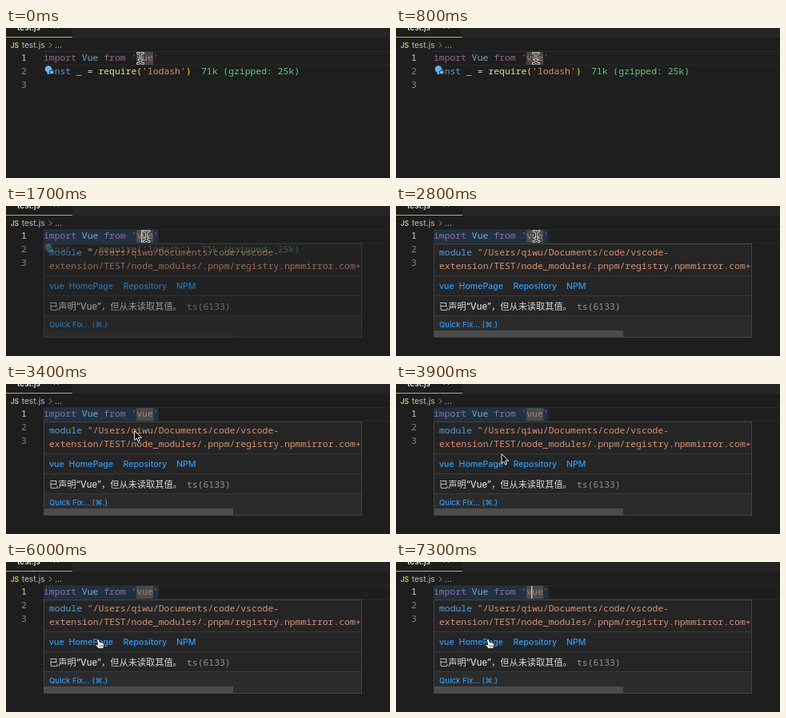
Animation, 480 px wide and 188 px high, one loop 8000 ms. Source, as an HTML page:

```html
<!DOCTYPE html>
<html lang="en">
<head>
<meta charset="utf-8">
<title>Hover card in a code editor</title>
<style>
html, body { margin: 0; width: 100%; height: 100%; overflow: hidden; background: #1e1e1e; }
svg { display: block; width: 480px; height: 188px; }
text { white-space: pre; }
.code { font: 500 11.4px "Noto Sans Mono", "DejaVu Sans Mono", monospace; fill: #d4d4d4; }
.ui { font: 500 9.6px Inter, "Noto Sans CJK SC", "Noto Sans CJK", "DejaVu Sans", sans-serif; fill: #a9a9a9; }
.ui.crumb { font-size: 10px; }
.ui.big { font-size: 10.6px; }
.ui.note { font-size: 11.2px; fill: #d8d8d8; }
.link { fill: #2f9bf4; }
.keyword { fill: #c586c0; }
.const { fill: #569cd6; }
.var { fill: #9cdcfe; }
.name { fill: #4fc1ff; }
.func { fill: #dcdcaa; }
.paren { fill: #ffd700; }
.str { fill: #d8906f; }
.cost { fill: #62c882; }
.num { fill: #858585; }
.pointer { stroke-linejoin: round; stroke-linecap: round; }
</style>
</head>
<body>
<svg viewBox="0 0 480 188">
  <defs>
    <clipPath id="card"><rect x="47" y="47" width="398" height="118"/></clipPath>
    <path id="ibeam" d="M-3.5-6.5Q-.5-6.5 0-4.5Q.5-6.5 3.5-6.5M0-4.5V4.5M-3.5 6.5Q-.5 6.5 0 4.5Q.5 6.5 3.5 6.5M-1.8 2.2H1.8"/>
  </defs>
  <rect width="480" height="188" fill="#1e1e1e"/>
  <rect x="83" width="397" height="12" fill="#252526"/>
  <rect y="11" width="83" height="1" fill="#a9b665"/>
  <text class="ui crumb" x="14" y="2.5" style="fill:#fff">test.js</text>
  <path d="M60-5l6 6M66-5l-6 6" stroke="#d0d0d0"/>

  <text class="ui" x="5.7" y="24.7" style="fill:#d8c94b;font-weight:600;font-size:8.5px">JS</text>
  <text class="ui crumb" x="19.7" y="24.8">test.js</text>
  <path d="M54 18.5l3 3-3 3" fill="none" stroke="#999"/>
  <text class="ui crumb" x="61" y="24.8">...</text>

  <path d="M47 29.5H480M47 46.5H480" stroke="#292929"/>
  <rect id="range" x="47" y="30" width="143.5" height="16" fill="#264f78" opacity=".4"/>
  <rect x="163" y="30" width="21" height="16" fill="#575757" opacity=".72"/>
  <text class="code num" x="19" y="40.8" style="fill:#d0d0d0">1</text>
  <text class="code num" x="19" y="57.8">2</text>
  <text class="code num" x="19" y="74.8">3</text>
  <text class="code" x="47" y="40.8" opacity=".7"><tspan class="keyword">import</tspan> <tspan class="var">Vue</tspan> <tspan class="keyword">from</tspan> <tspan class="str">'vue'</tspan></text>
  <text class="code" x="47" y="57.8"><tspan class="const">const</tspan> <tspan class="name">_</tspan> = <tspan class="func">require</tspan><tspan class="paren">(</tspan><tspan class="str">'lodash'</tspan><tspan class="paren">)</tspan></text>
  <text class="code cost" x="244" y="57.8">71k (gzipped: 25k)</text>
  <g>
    <rect x="47" y="47" width="9" height="12" fill="#1e1e1e"/>
    <circle cx="53" cy="51.5" r="4.3" fill="#62b6f2"/>
    <path d="M51.5 55h3v3h-3z" fill="#62b6f2"/>
    <circle cx="57" cy="55.5" r="2.6" fill="#75beff" stroke="#1e1e1e"/>
  </g>
  <rect id="caret" x="169" y="30" width="1.3" height="16" fill="#c8c8c8"/>

  <g id="hover" clip-path="url(#card)">
    <rect x="47.5" y="47.5" width="397" height="117" fill="#252526" stroke="#454545"/>
    <rect x="48" y="138" width="396" height="26" fill="#2b2b2c"/>
    <path d="M48 87.5H444M48 112.5H444M48 137.5H444" stroke="#393939"/>
    <text class="code" x="54" y="61.8"><tspan class="const">module</tspan> <tspan class="str">"/Users/qiwu/Documents/code/vscode-</tspan></text>
    <text class="code str" x="54" y="78.8">extension/TEST/node_modules/.pnpm/registry.npmmirror.com+</text>
    <text class="ui big link" x="54" y="103.8">vue</text>
    <text class="ui big link" x="78.5" y="103.8">HomePage</text>
    <text class="ui big link" x="146.5" y="103.8">Repository</text>
    <text class="ui big link" x="213" y="103.8">NPM</text>
    <text class="ui note" x="54" y="130" lang="zh-CN">已声明“Vue”，但从未读取其值。</text>
    <text class="code" x="226" y="129.8" style="fill:#929292">ts(6133)</text>
    <text class="ui link" x="54" y="151.5">Quick Fix... (⌘.)</text>
    <rect id="bar" x="48" y="156" width="236" height="8" fill="#4c4c4d"/>
  </g>

  <g id="beam" class="pointer" fill="none">
    <use href="#ibeam" stroke="#e2e2e2" stroke-width="2.8"/>
    <use href="#ibeam" stroke="#2a2a2a" stroke-width="1.1"/>
  </g>
  <g id="arrow" class="pointer">
    <path d="M0 0V11.5L2.7 9L4.6 13.2L6.5 12.3L4.7 8.2H8.3Z" fill="#080808" stroke="#f2f2f2"/>
  </g>
  <g id="hand" class="pointer">
    <path d="M-1 0Q.4-1 1.3.5L2.2 3.6Q3.6 2.8 4.3 4Q5.6 3.4 6.1 4.7Q7.6 4.5 7.7 6.2Q8 9 6.4 11.6H.8Q-.6 9.6-3.2 7.4Q-3.4 5.9-1.6 6.3L-.2 7.2L-1.5 1.3Q-1.6.4-1 0Z" fill="#f4f4f4" stroke="#111" stroke-width=".9"/>
    <path d="M2.2 7.2V9.6M4 7.2V9.6M5.8 7.2V9.6" stroke="#333" stroke-width=".6"/>
  </g>
</svg>
<script>
const LOOP = 8000, STEP = 100, BLINK = 1500;
const $ = id => document.getElementById(id);
const show = (id, on) => { $(id).style.display = on ? '' : 'none'; };
const ramp = (t, from, to) => Math.min(1, Math.max(0, (t - from) / (to - from)));

// time, x, y of the pointer's hot spot
const path = [
  [0, 168, 38], [300, 172, 38], [900, 175.5, 38], [2900, 175.5, 38],
  [3200, 172, 45], [3500, 155, 66], [3900, 132, 88],
  [4200, 121, 95], [4500, 115, 97], [LOOP, 115, 97]
];

function pointerAt(t) {
  const i = path.findIndex(p => p[0] > t);
  const [t0, x0, y0] = path[i - 1], [t1, x1, y1] = path[i];
  const k = ramp(t, t0, t1);
  return [x0 + (x1 - x0) * k, y0 + (y1 - y0) * k];
}

function draw(now) {
  const t = Math.floor(now % LOOP / STEP) * STEP;
  const [x, y] = pointerAt(t);
  const kind = y < 47 ? 'beam' : y > 93 && x < 134 ? 'hand' : 'arrow';
  for (const id of ['beam', 'arrow', 'hand']) {
    show(id, id === kind);
    $(id).setAttribute('transform', `translate(${x} ${y})`);
  }
  show('caret', Math.floor((t + 200) / BLINK) % 2 === 1);
  show('range', t >= 1400);
  $('hover').style.opacity = ramp(t, 1440, 1840);
  $('bar').style.opacity = ramp(t, 1640, 1940);
}

const start = performance.now();
function tick() {
  draw(performance.now() - start);
  requestAnimationFrame(tick);
}
tick();
</script>
</body>
</html>
```
